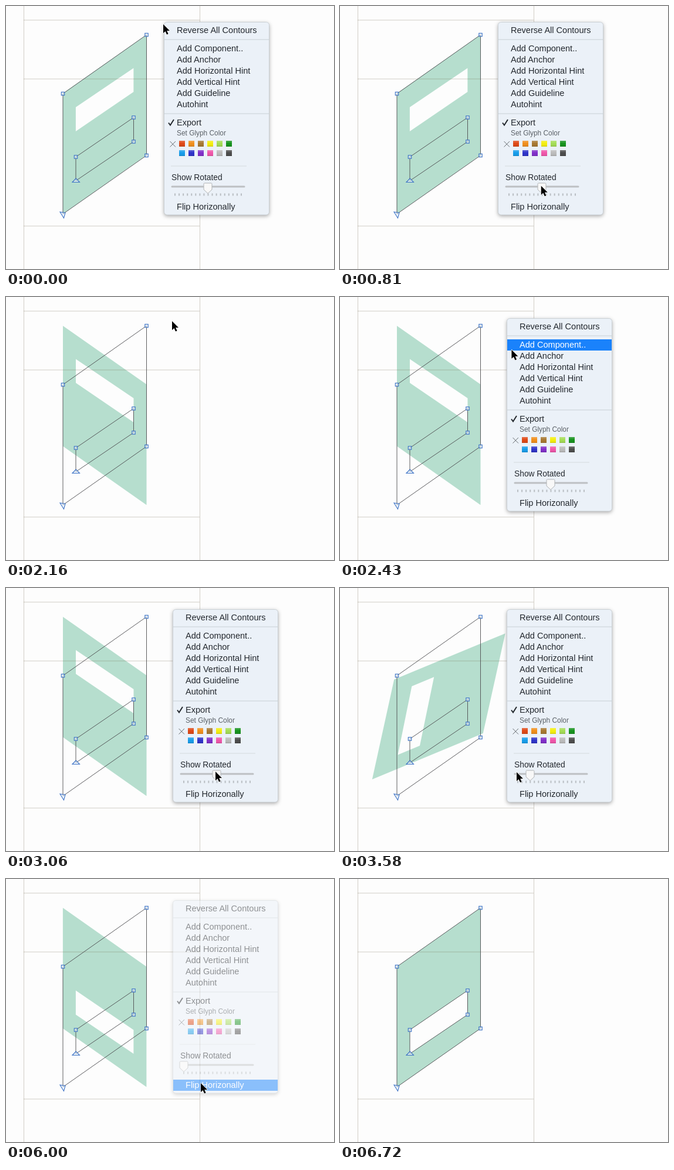
Recreate the animation shown at these times as an HTML page. Size 559 by 447 pixels, loop 6.99 s.

```html
<!DOCTYPE html>
<html lang="en">
<head>
<meta charset="utf-8">
<title>Flip and rotate preview</title>
<style>
  html, body { margin: 0; width: 100%; height: 100%; overflow: hidden; background: #fdfdfd; }
  svg { display: block; width: 559px; height: 447px; }
  text { font-family: "Liberation Sans", Arial, sans-serif; font-size: 14.55px; fill: #23282e; }
  .panel { filter: drop-shadow(0 2px 3px rgba(0, 0, 0, .32)); }
  .on text { fill: #fff; }
  .on path { stroke: #fff; }
  .bar { fill: none; }
  .on .bar { fill: #1a82fb; }
</style>
</head>
<body>
<svg viewBox="0 0 559 447" xmlns="http://www.w3.org/2000/svg">
  <defs>
    <linearGradient id="gloss" x1="0" y1="0" x2="0" y2="1">
      <stop offset="0" stop-color="#fff" stop-opacity=".25"/>
      <stop offset=".5" stop-color="#fff" stop-opacity="0"/>
      <stop offset="1" stop-color="#000" stop-opacity=".15"/>
    </linearGradient>
  </defs>
  <path id="fill" fill="#b6dece" fill-rule="evenodd"/>
  <path d="M30.5 0V447M330.5 0V447M30 24H330M30 124H330M30 374H330" fill="none" stroke="#5a4628" stroke-opacity=".26"/>
  <path id="outline" fill="none" stroke="#4c4c50" stroke-width=".9"/>
  <g id="nodes" fill="#e4f0fb" fill-opacity=".6" stroke="#3a70c4" stroke-width="1.1">
    <path d="M92 350L101 351.500L98.500 360.500Z"/>
    <path d="M113 299.500H125.500L119.200 293Z"/>
  </g>
  <g id="menu">
    <rect class="panel" x="269.500" y="27.500" width="179" height="327.500" rx="5" fill="#ebf1f8" stroke="#c3c9ce" stroke-width=".8"/>
    <path d="M270 57H448M270 183H448" stroke="#d3dbe1" stroke-width="1.600"/>
    <path d="M281 272H410" stroke="#d5dade"/>
    <g id="rows"></g>
    <text x="291" y="220" style="font-size:11.900px;fill:#5c6268">Set Glyph Color</text>
    <path d="M279.500 230L289 239.500M289 230L279.500 239.500" stroke="#666b70"/>
    <g id="swatches"></g>
    <text x="282" y="296" style="font-size:13.800px">Show Rotated</text>
    <path d="M283 307H406" stroke="#bdc0c3" stroke-width="3" stroke-linecap="round"/>
    <path d="M287 320.500H402" stroke="#b9bec3" stroke-width="4" stroke-dasharray="2 5.060"/>
    <path id="knob" d="M-7 -6.500Q-7 -8 -5.500 -8H5.500Q7 -8 7 -6.500V3L0 9.500L-7 3Z" fill="#f8f8f8" stroke="#b0b3b6"/>
  </g>
  <path id="cursor" d="M0 0V15.200L3.500 12L6 17.600L8.600 16.500L6.200 11H11Z" fill="#000" stroke="#fff" stroke-width="1.200" stroke-linejoin="round" paint-order="stroke"/>
</svg>
<script>
const $ = id => document.getElementById(id);
const LOOP = 6990;

function add(parent, tag, attrs, text = '') {
  const el = document.createElementNS('http://www.w3.org/2000/svg', tag);
  for (const k in attrs) el.setAttribute(k, attrs[k]);
  el.textContent = text;
  return parent.appendChild(el);
}

const outer = [[97, 149], [239.5, 49], [239.5, 254], [97, 353.5]];
const slot = [[119, 256.5], [217.5, 189.5], [217.5, 230.5], [119, 297]];
const glyph = [outer, slot].map(p => 'M' + p.join('L') + 'Z').join('');
$('fill').setAttribute('d', glyph);
$('outline').setAttribute('d', glyph);
// The last point of each contour is its start node, drawn as a triangle.
for (const [x, y] of [...outer.slice(0, 3), ...slot.slice(0, 3)])
  add($('nodes'), 'rect', { x: x - 2.7, y: y - 2.7, width: 5.4, height: 5.4 });

const rows = [
  [41, 'Reverse All Contours'], [72, 'Add Component..'], [91, 'Add Anchor'],
  [110, 'Add Horizontal Hint'], [129, 'Add Vertical Hint'], [148, 'Add Guideline'],
  [167, 'Autohint'], [198, 'Export'], [341, 'Flip Horizonally']
].map(([y, label]) => {
  const el = add($('rows'), 'g', {});
  add(el, 'rect', { class: 'bar', x: 270, y: y - 9, width: 178, height: 19 });
  add(el, 'text', { x: 291, y: y + 5 }, label);
  if (label === 'Export')
    add(el, 'path', { d: 'M277 198.500L280 202.500L286 193', fill: 'none', stroke: '#23282e', 'stroke-width': 2 });
  return { y, el };
});

['#de4410', '#f08c16', '#a5752c', '#f4ee08', '#a2dc52', '#109018',
 '#129bea', '#2a2fc8', '#7e2ac8', '#f052a8', '#bababa', '#484848'].forEach((color, i) => {
  const box = { x: 295 + i % 6 * 16, y: i < 6 ? 229 : 245, width: 10, height: 10 };
  add($('swatches'), 'rect', { ...box, fill: color });
  add($('swatches'), 'rect', { ...box, fill: 'url(#gloss)' });
});

// Keys: [time, x, y]
const pointer = [
  [270, 268, 31], [900, 351, 336], [1440, 351, 336], [1620, 360, 300], [2160, 283, 41],
  [2340, 283, 41], [2790, 345, 361], [3060, 357, 312], [3150, 357, 312], [3330, 371, 313],
  [3580, 301, 313], [3840, 299, 312], [3930, 299, 312], [4110, 262, 313], [4470, 262, 313],
  [5100, 332, 347], [6180, 332, 347], [6630, 505, 452]
];
const slider = [[3150, 344], [3240, 359], [3330, 359], [3510, 324], [3580, 309], [3670, 288]];

function track(keys, t, ease = u => u) {
  const i = keys.findIndex(k => k[0] > t);
  if (i === 0) return keys[0].slice(1);
  if (i < 0) return keys[keys.length - 1].slice(1);
  const a = keys[i - 1], b = keys[i];
  const u = ease((t - a[0]) / (b[0] - a[0]));
  return a.slice(1).map((v, j) => v + (b[j + 1] - v) * u);
}

const soft = u => .5 * u + .5 * u * u * (3 - 2 * u);
const within = (t, a, b) => t >= a && t < b;

// The screen refreshes every 90 ms, re-synced around the slider drag.
function tick(t) {
  const base = t < 3580 ? 0 : t < 3840 ? 3580 : 3840;
  return base + Math.floor((t - base) / 90) * 90;
}

function draw(time) {
  const t = tick(time);
  const [x, y] = track(pointer, t, soft);
  const [knob] = track(slider, t);
  const angle = (knob - 288) * 180 / 56;
  const flip = within(t, 1530, 6270) ? -1 : 1;
  $('fill').setAttribute('transform',
    `translate(168.2 201.3) rotate(${angle}) scale(${flip} 1) translate(-168.2 -201.3)`);

  const second = t >= 1350;
  const dx = second ? 15 : 0, dy = second ? 9 : 0;
  const fading = within(t, 1260, 1350) || within(t, 6000, 6090);
  const open = t < 1350 || within(t, 2250, 6090);
  $('menu').setAttribute('transform', `translate(${dx} ${dy})`);
  $('menu').setAttribute('opacity', fading ? .5 : open ? 1 : 0);

  const blink = within(t, 1080, 1260) || within(t, 5820, 5910);
  const mx = x - dx, my = y - dy;
  for (const row of rows) {
    const hot = !blink && mx > 270 && mx < 448 && my >= row.y - 9 && my < row.y + 10;
    row.el.setAttribute('class', hot ? 'on' : '');
  }
  $('knob').setAttribute('transform', `translate(${knob} 309)`);
  $('cursor').setAttribute('transform', `translate(${x} ${y})`);
}

const start = performance.now();
function frame() {
  draw((performance.now() - start) % LOOP);
  requestAnimationFrame(frame);
}
frame();
</script>
</body>
</html>
```
